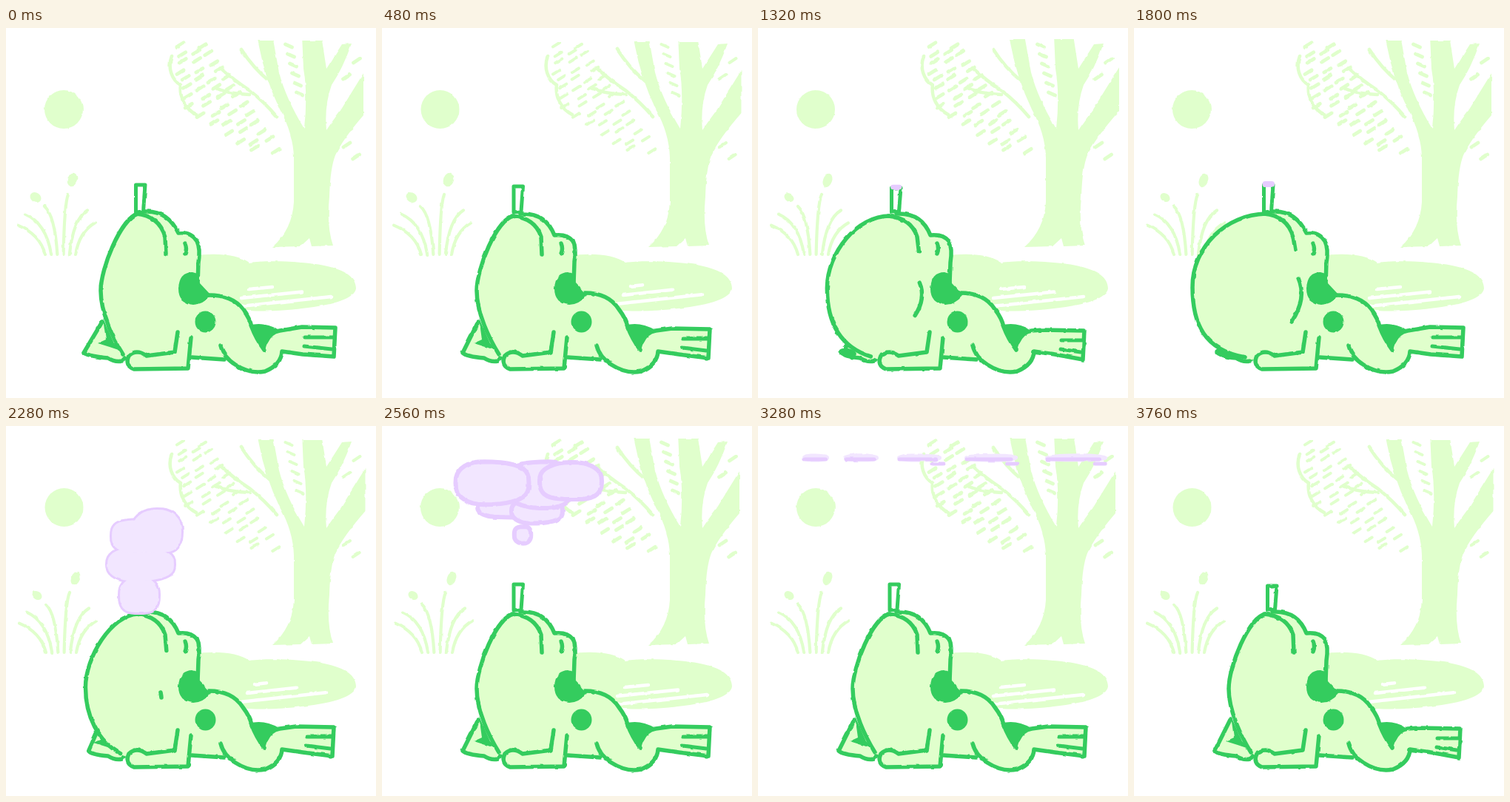
Animation of 500x500 px, one loop 3.84 s. Source, as an HTML page:

```html
<!DOCTYPE html>
<html lang="en">
<head>
<meta charset="utf-8">
<title>Frog by the pond</title>
<style>
html, body { margin: 0; width: 100%; height: 100%; overflow: hidden; background: #fff; }
svg { display: block; width: 100vw; height: 100vh; }
path { stroke-linecap: round; stroke-linejoin: round; }
</style>
</head>
<body>
<svg viewBox="0 0 500 500">
  <defs id="defs"></defs>
  <g id="scene"></g>
  <g id="frog"></g>
  <g id="smoke"></g>
</svg>
<script>
const LOOP = 3840, STEP = 120, EXHALE = 1960;
const PALE = '#e0ffcc', GREEN = '#34cc5e', LILAC = '#e6ccff', MIST = '#f2e6ff';
const $ = id => document.getElementById(id);

const mix = (a, b, t) => a + (b - a) * t;
const mixAll = (a, b, t) => a.map((n, i) => mix(n, b[i], t));
const clamp = n => Math.max(0, Math.min(1, n));
const times = (n, fn) => Array.from({ length: n }, (_, i) => fn(i)).join('');
const noise = n => { const s = Math.sin(n * 12.9898) * 43758.5453; return s - Math.floor(s) - .5; };
const line = (d, color, w) => `<path d="${d}" fill="none" stroke="${color}" stroke-width="${w}"/>`;
const area = (d, color) => `<path d="${d}" fill="${color}"/>`;
const oval = (x, y, rx, ry, color, turn = 0) =>
  `<ellipse cx="${x}" cy="${y}" rx="${rx}" ry="${ry}" fill="${color}" transform="rotate(${turn} ${x} ${y})"/>`;
const rough = (v, inner) => `<g filter="url(#rough${v})">${inner}</g>`;

// Three rough-edge filters and picture edges give the drawing its boil
$('defs').innerHTML = times(3, v => `
  <filter id="rough${v}" filterUnits="userSpaceOnUse" x="0" y="0" width="500" height="500" color-interpolation-filters="sRGB">
    <feTurbulence type="fractalNoise" baseFrequency=".09" numOctaves="2" seed="${v + 3}" result="n"/>
    <feDisplacementMap in="SourceGraphic" in2="n" scale="2.6" xChannelSelector="R" yChannelSelector="G"/>
  </filter>
  <clipPath id="edge${v}"><rect y="${15 + (v + 1) * 2 % 6}" width="${483 + v * 2.5}" height="480"/></clipPath>`);

const TREE = 'M339 10L342 25Q350 68 370 110Q388 142 389 175L389 235Q387 272 360 296L398 295L410 284L413 295' +
  'L442 294Q433 268 437 228Q438 190 445 172Q456 148 490 110L490 50Q470 82 453 110Q441 126 433 138' +
  'Q430 105 440 77Q455 55 467 21L454 22L433 55L426 10L400 10L402 55Q408 90 403 136Q378 95 369 60L360 10Z';
const BRANCHES = 'M290 54Q307 70 330 85Q350 101 366 120M283 81Q300 89 329 90M318 29Q334 54 356 72' +
  'M224 38C218 54 224 70 236 77C234 94 242 109 257 117';
const POND = 'M255 308C280 303 315 306 329 317C350 314 400 315 430 321C460 327 473 338 473 352' +
  'C471 365 445 374 400 379C370 383 335 384 310 380L255 360Z';

const dash = (x, y, slope) => `M${x - 4.5} ${y + slope}L${x + 4.5} ${y - slope}`;

// Slanted dashes in rows that slide right towards the lower crown
function leaves(v) {
  const rows = times(13, r => {
    const y = 22 + 11.8 * r;
    const left = y < 115 ? 238 + Math.max(0, y - 60) * .25 : 262 + (y - 115) * 1.5;
    const right = 262 + (y - 20) * .7;
    const n = Math.max(2, Math.round((right - left) / 21) + 1);
    return times(n, i => dash(mix(left, right, i / (n - 1)) + 5 * noise(r * 9 + i), y + 6 * noise(r * 5 + i + 40), 2.8));
  });
  const gap = times(6, i => dash(382 + 3 * i, 24 + 13 * i, -2));
  const side = [44, 66, 139, 158, 174].map(y => dash(467 + 7 * Math.cos(y * 3), y, 3)).join('');
  return line(rows + gap + side, PALE, v === 1 ? 4 : 4.8);
}

function reeds(sway) {
  const stems = times(6, i => {
    const u = (i - 2.5) / 2.5, foot = 53 + sway + 8.2 * i;
    const x = 68 + 2 * sway + 52 * Math.sin(u * Math.PI / 2), y = 225 + 40 * Math.abs(u) - 1.6 / u;
    return `M${x} ${y}Q${mix(x, foot, .8)} ${y + 12} ${foot} 306`;
  });
  return line(stems, PALE, 4.2) +
    oval(40 + 2 * sway, 229, 8 - sway, 6.5 - sway, PALE, 35) +
    oval(90 + 4 * sway, 205 + sway, 7 - sway, 9.5, PALE, 20);
}

function glints(v) {
  const near = v === 1 ? 8 : 0;
  return line(times(3, i => `M${328 - 10 * i + near} ${353 + 12 * i - near / 2}` +
    `L${360 + 40 * i - near} ${350 + 6.5 * i - near / 3}`), '#fff', 4.5);
}

function scene(k) {
  const v = k % 3;
  return rough(v, oval(78 + v % 2 * .5, 110, 26, 26, PALE) + reeds(k % 2) +
    `<g clip-path="url(#edge${v})">${area(TREE, PALE) + leaves(v)}</g>` +
    line(BRANCHES, PALE, 4.6) + area(POND, PALE) + glints(v));
}

function straw(v, ember) {
  const x = 175.5 + 2.5 * v, y = 212 + 2 * v;
  return `<path d="M${x} ${y}h12.5L${x + 10} 248L${x} 249Z" fill="#fff" stroke="${GREEN}" stroke-width="5"/>` +
    (ember ? line(`M${x + 2} ${y - 1}h8.5`, LILAC, mix(4.5, 8, ember)) : '');
}

function frog(puff, v, ember) {
  const ink = d => line(d, GREEN, 5.5);
  const both = d => area(d, PALE) + ink(d);
  const lift = v ? 3 : 0;

  // Back and belly swell to the left with the breath
  const b = mixAll([155,258, 128,325, 128,355, 128,385, 145,420, 158,441],
    [125,252, 79,295, 79,350, 79,400, 95,435, 150,445], puff);
  const belly = `M178 ${251 + lift}C${b.slice(0, 6)}C${b.slice(6)}`;
  const elbow = mix(v ? 109 : 105, 124, puff * puff);
  const cheek = clamp((puff - .42) / .4);

  const toeX = 445 - 2 * v, toeY = 405 + 2 * v;
  const foot = `M351 425Q357 411 370 409L${400 - 8 * v} ${404 + 2 * v}L${toeX} ${toeY}l-2 39L401 441L373 437` +
    'Q372 455 350 464Q330 468 310 455Q294 445 290 429';
  const toes = `M${404 + 3 * v} ${toeY + 13}H${toeX - 2}M${403 + 3 * v} ${toeY + 25}L${toeX - 5} ${toeY + 29}`;
  const arm = 'M232 411L228 438L190 443Q176 433 166 443Q160 456 173 461L246 460L250 418';

  return rough(v,
    both(`M130 397L${elbow} 439Q114 444 138 446Q147 452 157 450L166 440`) +
    `<g transform="translate(${-14 * puff} ${5 * puff})">` +
      area('M131 392L146 426L158 437L140 431L124 426L135 421Z', GREEN) + '</g>' +
    (puff > .6 ? oval(121, 439, 12, 6, GREEN, 10) : '') +
    area(belly + 'L172 452L246 460L250 446L292 448L349 437Q335 412 331 402Q322 363 276 361' +
      'L259 345L260 317Q263 298 258 288Q250 277 233 279Q215 250 190 249Z', PALE) +
    area(foot + 'L330 400Z', PALE) + ink(foot) + line(toes, GREEN, 5) +
    ink(belly) +
    ink(`M187 ${248 + lift}Q${218 + lift} ${246 + lift} 233 ${277 + lift}Q250 ${275 + lift} 258 288Q263 298 260 317L259 345`) +
    ink(`M176 ${251 + lift}Q207 ${254 + lift} 215 282L${216 + 2 * puff} ${306 - 6 * puff}`) +
    ink(`M274 ${361 - lift}Q306 ${361 - lift} 320 380Q330 393 332 404Q338 420 349 435`) +
    ink('M251 445L295 448') + both(arm) + ink('M242 291Q245 298 242 305') +
    area('M259 332L262 345L277 361Q266 374 253 374Q233 372 233 352Q234 330 252 330Z', GREEN) +
    oval(269.5, 397, 14, 14.5, GREEN) +
    area('M328 402Q348 396 369 408Q354 417 350 435Q338 418 328 402Z', GREEN) +
    (puff > .35 ? ink(`M${mix(209, 222, cheek)} ${mix(360, 338, cheek)}` +
      `Q${mix(210, 234, cheek)} 365 ${mix(210, 213, cheek)} ${mix(367, 397, cheek)}`) : '') +
    straw(v, ember));
}

// Each row: centre and radii
const LOBES = [[180,229,26,24], [182,187,45,22], [171,149,28,22], [204,143,33,29]];
const CLOUDS = [[164,89,64,12], [229,95,46,13], [238,59,64,25], [320,55,56,20], [108,57,66,23]];
const DROP = [190, 127, 15, 9];

// Squarish oval with a slightly uneven rim
function puffPath(x, y, rx, ry, seed) {
  const bend = (n, p) => Math.sign(n) * Math.abs(n) ** p;
  return 'M' + Array.from({ length: 40 }, (_, i) => {
    const a = i * Math.PI / 20, r = 1 + .04 * Math.sin(3 * a + seed * 2);
    return [x + rx * bend(Math.cos(a), .8), y + ry * r * bend(Math.sin(a), .75)];
  }).join('L') + 'Z';
}
const rim = d => line(d, LILAC, 6);

function plume(j) {
  const grow = (j + 1) / 3, tall = Math.min(grow, 1.2), rise = 20 * Math.max(0, j - 2) ** 2;
  const paths = LOBES.map(([x, y, rx, ry], i) =>
    puffPath(182 + (x - 182) * grow, 252 + (y - 252) * tall - rise, rx * grow, ry * tall, i));
  return paths.map(rim).join('') + paths.map(d => area(d, MIST)).join('');
}

function clouds(spread, thin, size) {
  const wispy = thin > .4;
  const rows = wispy ? CLOUDS : [...CLOUDS, DROP];
  return rows.map((row, i) => {
    const slot = (i + 1) % 5;
    const wisp = [78 + 52 * slot + 9 * slot * slot, 43, 18 + 6 * slot, 5.5];
    const [cx, cy, w, h] = mixAll(row, wisp, thin);
    const x = mix(190, cx, spread), y = cy + (1 - spread) * 40;
    const rx = w * mix(.5, 1, spread) * size, ry = h * mix(1.5, 1, spread) * size;
    const d = puffPath(x, y, rx, ry, i);
    if (!wispy) return area(d, MIST) + rim(d);
    const tail = slot > 1 ? `M${x + rx * .6} ${y + 8}h${14 * size}` : '';
    return area(d, MIST) + line(`M${x - rx + 3} ${y + 2}H${x + rx * .75}${tail}`, LILAC, 5 * size);
  }).join('');
}

function smoke(j) {
  if (j < 0 || j > 13) return '';
  return rough(j % 3, j < 5 ? plume(j) : clouds(clamp((j - 3) / 4), clamp((j - 7) / 4), clamp((14 - j) / 3)));
}

let shown = '';

function render(ms) {
  const t = ms % LOOP, k = Math.floor(t / STEP), j = Math.floor((t - EXHALE) / STEP);
  if (shown === k + '/' + j) return;
  shown = k + '/' + j;
  const held = Math.min(k, 15), inhaling = j < 0;
  const puff = inhaling ? Math.sin(clamp((held - 7) / 8) * Math.PI / 2) : clamp(1 - j / 5) ** 1.7;
  const ember = inhaling ? clamp((held - 5) / 10) : 0;
  $('scene').innerHTML = scene(k);
  $('frog').innerHTML = frog(puff, inhaling ? held % 3 : (j + 2) % 3, ember);
  $('smoke').innerHTML = smoke(j);
}

const start = performance.now();
function tick() {
  render(performance.now() - start);
  requestAnimationFrame(tick);
}
tick();
</script>
</body>
</html>
```
